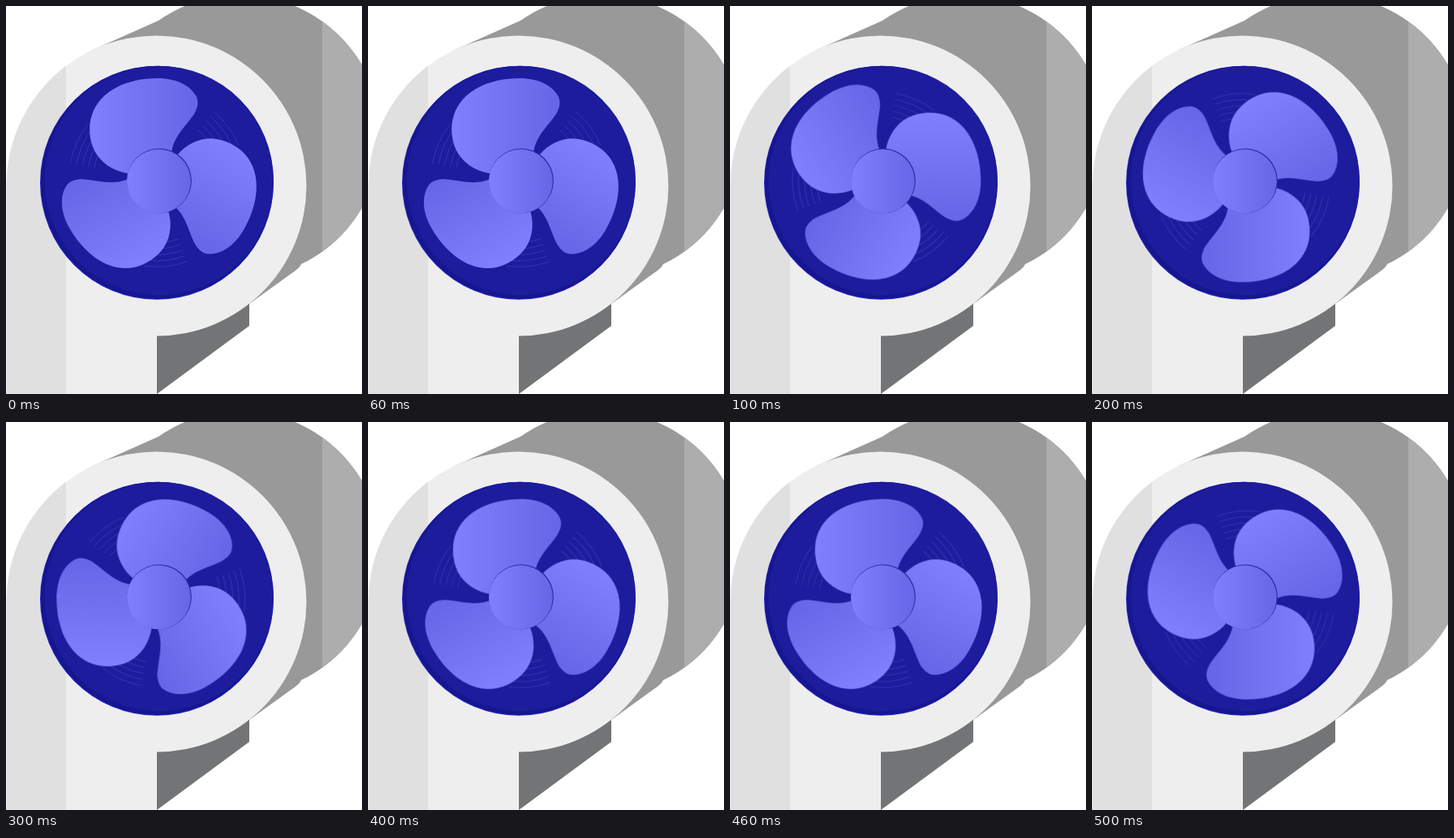
Recreate the animation shown at these times as an HTML page. Size 439x478 px, loop 0.6 s.

```html
<!DOCTYPE html>
<html lang="en">
<head>
<meta charset="utf-8">
<title>Blower fan</title>
<style>
html, body { margin: 0; width: 100%; height: 100%; overflow: hidden; background: #fff; }
svg { display: block; width: 439px; height: 478px; }
#rotor { transform-origin: 188.75px 215.4px; }
</style>
</head>
<body>
<svg viewBox="0 0 439 478">
  <defs>
    <linearGradient id="bladeFill" gradientUnits="userSpaceOnUse" x1="105" y1="148" x2="232" y2="148">
      <stop offset="0" stop-color="#8080ff"/>
      <stop offset="1" stop-color="#6666e6"/>
    </linearGradient>
    <linearGradient id="hubFill">
      <stop offset="0" stop-color="#8080ff"/>
      <stop offset="1" stop-color="#6666e6"/>
    </linearGradient>
    <clipPath id="side"><rect width="74" height="478"/></clipPath>
    <clipPath id="end"><rect x="390" width="49" height="478"/></clipPath>
    <path id="back" d="M106 54.5 L188 18 A174.5 174.5 0 1 1 364 318 Q362 323 352 329.500 L300 367 L185 221Z"/>
    <path id="body" d="M.5 478 V221.500 A185 185 0 1 1 185.500 406.500 V478Z"/>
    <path id="blade" fill="url(#bladeFill)" d="M149 206 C131 203 116 192 109 178 C103 166 101 148 106 134 C116 104 150 89 187 89 C210 89 228 98 235 112 C238 119 236 126 232 133 C222 148 207 160 204 181 L188 215Z"/>
  </defs>

  <use href="#back" fill="#999"/>
  <use href="#back" fill="#adadad" clip-path="url(#end)"/>
  <path d="M186 400 V478 L300 394 V360Z" fill="#737476"/>
  <use href="#body" fill="#eee"/>
  <use href="#body" fill="#e0e0e0" clip-path="url(#side)"/>

  <circle cx="186" cy="217.700" r="144" fill="#2020c0"/>
  <circle cx="186.300" cy="217.300" r="143.300" fill="#16168f"/>
  <circle cx="188.700" cy="215" r="141.200" fill="#1c1c9c"/>

  <g id="rotor"></g>

  <circle cx="189" cy="215.300" r="39.900" fill="#2c2ca8"/>
  <circle cx="188.400" cy="215.800" r="39.400" fill="url(#hubFill)"/>
</svg>
<script>
const rotor = document.getElementById('rotor');
// The blades sit slightly off the pivot, which makes them wobble.
const cx = 186.3, cy = 212.9;

function add(name, attrs) {
  const el = document.createElementNS('http://www.w3.org/2000/svg', name);
  for (const key in attrs) el.setAttribute(key, attrs[key]);
  rotor.append(el);
}

function point(r, deg) {
  const a = deg * Math.PI / 180;
  return `${(cx + r * Math.cos(a)).toFixed(2)} ${(cy + r * Math.sin(a)).toFixed(2)}`;
}

const turns = [0, 120, 240];
for (const turn of turns) {
  for (let i = 0; i < 5; i++) {
    const r = 108.5 - i * 7.5;
    add('path', {
      d: `M${point(r, turn - 50)} A${r} ${r} 0 0 1 ${point(r, turn - 22 - i)}`,
      fill: 'none', stroke: '#3c3cbc', 'stroke-width': 0.8
    });
  }
}
for (const turn of turns) {
  add('use', { href: '#blade', transform: `rotate(${turn} ${cx} ${cy})` });
}

const poses = [0, -30, -60, -90, -120, -180];
const steps = poses.map((deg, i) => ({
  transform: `rotate(${deg}deg)`, offset: i / poses.length, easing: 'step-end'
}));
steps.push({ transform: 'rotate(-360deg)', offset: 1 });
rotor.animate(steps, { duration: 600, iterations: Infinity });
</script>
</body>
</html>
```
